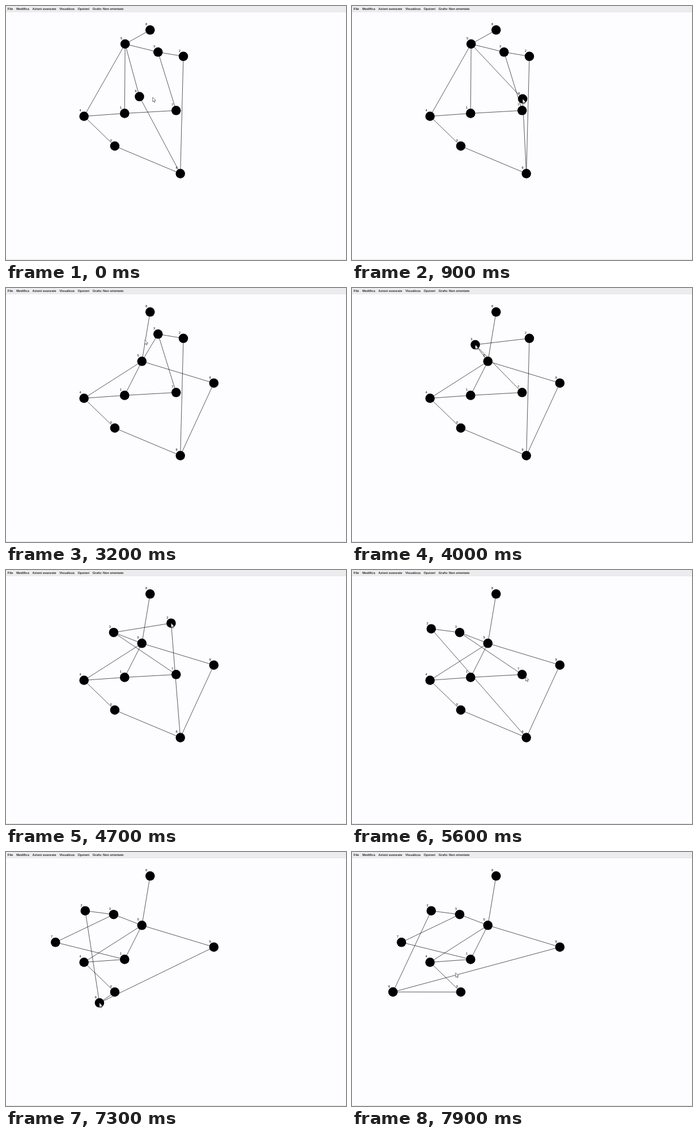
Animation, 600 px wide and 448 px high, one loop 8000 ms. Source, as an HTML page with a canvas:

```html
<!DOCTYPE html>
<html lang="it">
<head>
<meta charset="utf-8">
<title>Grafo</title>
<style>
html, body { margin: 0; width: 600px; height: 448px; overflow: hidden; background: #fdfcfe; }
canvas { display: block; }
</style>
</head>
<body>
<canvas id="stage" width="600" height="448"></canvas>
<script>
const ctx = document.getElementById('stage').getContext('2d');
const LOOP = 8000, STEP = 100, RADIUS = 8.3;

const menu = ['File', 'Modifica', 'Azioni avanzate', 'Visualizza', 'Opzioni', 'Grafo: Non orientato'];
const edges = '58 53 32 37 59 51 54 41 17 40 06 96 26'.split(' ');

// Home position of each node, by its label.
const homes = [
  [192, 247], [209.3, 189.4], [313, 88.8], [268.3, 81.3], [137.7, 194.5],
  [210.2, 67], [307.7, 295.6], [300.2, 184.3], [254.3, 42.3], [235.5, 159.8]
];

// Pointer strokes in order; one that names a node drags it along.
const origin = [258.8, 161];
const strokes = [];
const move = (start, end, to) => strokes.push({ start, end, to });
const drag = (node, start, end, to) => strokes.push({ start, end, to, node });

move(0, 300, homes[9]);
drag(9, 400, 1400, [366.8, 167.7]);
move(1500, 2100, homes[5]);
drag(5, 2200, 3000, [239.8, 129.3]);
move(3000, 3200, [245, 91.5]);
move(3200, 3600, homes[3]);
drag(3, 3700, 4200, [190, 110.2]);
move(4200, 4500, homes[2]);
drag(2, 4500, 4700, [291.4, 93.7]);
drag(2, 4700, 5200, [139.8, 103.7]);
move(5200, 5600, [306.5, 188]);
move(5600, 5700, homes[7]);
drag(7, 5700, 6100, [87.3, 159.3]);
move(6100, 6400, [316, 242]);
move(6400, 6700, [330.8, 289]);
move(6700, 6900, homes[6]);
drag(6, 6900, 7600, [72.3, 246.9]);
move(7600, 7900, [182.8, 213]);

const ease = k => k * k * (3 - 2 * k);

function sceneAt(t) {
  const nodes = homes.slice();
  let pointer = origin;
  for (const { start, end, to, node } of strokes) {
    if (t <= start) break;
    const k = ease(Math.min(1, (t - start) / (end - start)));
    pointer = pointer.map((from, axis) => from + (to[axis] - from) * k);
    if (node !== undefined) nodes[node] = pointer;
  }
  return { nodes, pointer };
}

function drawMenu() {
  ctx.fillStyle = '#ecebed';
  ctx.fillRect(0, 0, 600, 10);
  ctx.fillStyle = '#dad9db';
  ctx.fillRect(0, 10, 600, 0.6);
  ctx.fillStyle = '#e4e3e5';
  ctx.fillRect(0, 447, 600, 1);
  ctx.fillStyle = '#2c2c2c';
  ctx.font = 'bold 5.6px "Liberation Sans", Arial, sans-serif';
  let x = 2.8;
  for (const label of menu) {
    ctx.fillText(label, x, 7);
    x += ctx.measureText(label).width + 5.7;
  }
}

function drawGraph(nodes) {
  ctx.strokeStyle = '#000';
  ctx.lineWidth = 0.65;
  ctx.beginPath();
  for (const [a, b] of edges) {
    ctx.moveTo(...nodes[a]);
    ctx.lineTo(...nodes[b]);
  }
  ctx.stroke();
  ctx.fillStyle = '#000';
  ctx.font = '5.8px "Liberation Sans", Arial, sans-serif';
  nodes.forEach(([x, y], id) => {
    ctx.beginPath();
    ctx.arc(x, y, RADIUS, 0, Math.PI * 2);
    ctx.fill();
    ctx.fillText(id, x - 8.2, y - 8.2);
  });
}

const arrow = new Path2D('M0 0V8L1.8 6.3L3 9L4.2 8.5L3.1 5.8H5.5Z');

function drawPointer([x, y]) {
  ctx.save();
  ctx.translate(x, y);
  ctx.fillStyle = '#fff';
  ctx.fill(arrow);
  ctx.strokeStyle = '#111';
  ctx.lineWidth = 0.55;
  ctx.stroke(arrow);
  ctx.restore();
}

function draw(now) {
  const t = Math.floor((now % LOOP) / STEP) * STEP;
  const { nodes, pointer } = sceneAt(t);
  ctx.fillStyle = '#fdfcfe';
  ctx.fillRect(0, 0, 600, 448);
  drawMenu();
  drawGraph(nodes);
  drawPointer(pointer);
}

const start = performance.now();
function tick() {
  draw(performance.now() - start);
  requestAnimationFrame(tick);
}
tick();
</script>
</body>
</html>
```
